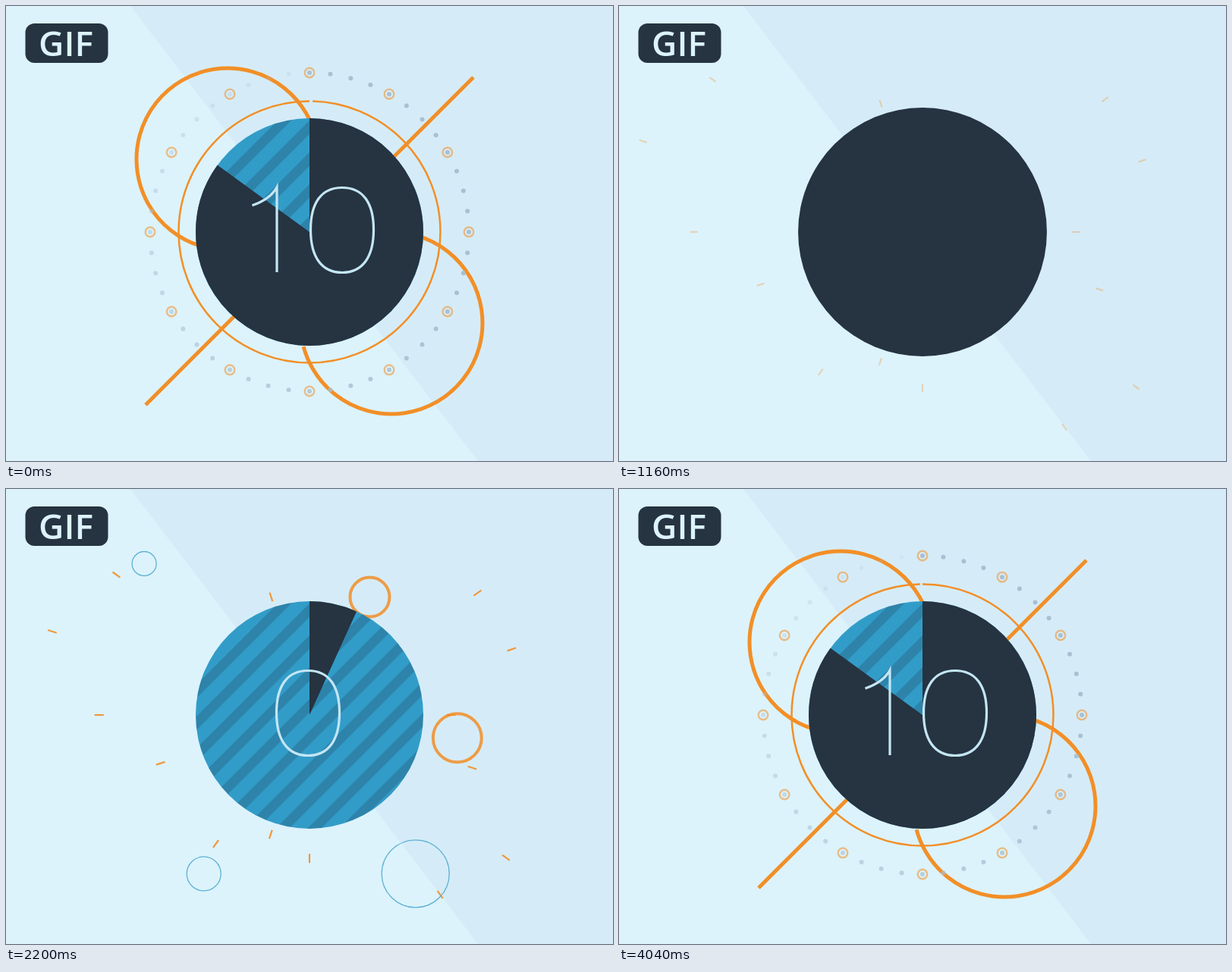
Animation of 800 by 600 pixels, one loop 4.08 s. Source, as an HTML page:

```html
<!DOCTYPE html>
<html lang="en">
<head>
<meta charset="utf-8">
<title>Countdown dial</title>
<style>
  html, body { margin: 0; width: 100%; height: 100%; overflow: hidden; background: #dcf3fc; }
  svg { display: block; width: 800px; height: 600px; }
  .label { font: 600 46px "Open Sans", "Noto Sans", sans-serif; fill: #dcf3fc; text-anchor: middle; }
</style>
</head>
<body>
<svg id="stage" viewBox="0 0 800 600" fill="none">
  <defs>
    <pattern id="stripes" width="29.7" height="30" patternUnits="userSpaceOnUse" patternTransform="rotate(45) translate(-14.85 0)">
      <rect width="29.7" height="30" fill="#329cc8"/>
      <rect width="12.7" height="30" fill="#2d83aa"/>
    </pattern>
    <clipPath id="discClip"><circle id="clipDisc" cx="400" cy="298"/></clipPath>
  </defs>
  <rect width="800" height="600" fill="#dcf3fc"/>
  <path d="M164 0H800V600H622Z" fill="#d5ecf8"/>
  <g id="back"></g>
  <g id="icon">
    <circle id="disc" cx="400" cy="298" fill="#263341"/>
    <g id="cigarette" clip-path="url(#discClip)" fill="#def3fc">
      <path d="M409 230C385 233 378 246 381 260C384 274 397 290 398 305C399 318 386 328 387 346Q390 350 391 347C393 330 406 322 405 303C404 288 395 277 393 264C391 248 397 238 409 230Z"/>
      <path d="M375 305C382 299 392 304 389 313C386 321 380 325 383 334C385 340 389 343 392 350C383 345 374 336 375 327C376 318 385 316 384 309C383 305 379 304 375 305Z"/>
      <path d="M394 342L405 332V351L395 346ZM407 332L486 328L484 332L411 336V345.500L480 343L476 348L407 351.500Z"/>
    </g>
    <circle id="glow" cx="400" cy="298" fill="#f7931e"/>
  </g>
  <circle id="wave" cx="400" cy="298" stroke="#086cb1" opacity=".72"/>
  <g id="dial">
    <circle r="150" fill="url(#stripes)"/>
    <circle id="pie" r="75" stroke="#263341" stroke-width="150" pathLength="1" transform="rotate(-90)"/>
  </g>
  <g id="number" stroke="#c4e6f4" stroke-width="3.200"></g>
  <rect x="25.500" y="23" width="109" height="52" rx="12" fill="#263341"/>
  <text class="label" x="79" y="66">GIF</text>
</svg>
<script>
const LOOP = 4080, CUT = 1150, CX = 400, CY = 298, ORANGE = '#f28f27';
const $ = id => document.getElementById(id);

function add(parent, tag, attrs) {
  const el = document.createElementNS('http://www.w3.org/2000/svg', tag);
  set(el, attrs);
  return parent.appendChild(el);
}
function set(el, attrs) {
  for (const name in attrs) el.setAttribute(name, attrs[name]);
}
const show = (el, on) => set(el, { visibility: on ? 'visible' : 'hidden' });

const clamp = x => Math.min(1, Math.max(0, x));
const span = (t, start, length) => clamp((t - start) / length);
const sine = p => (1 - Math.cos(Math.PI * p)) / 2;
const inQuad = p => p * p;
const inCubic = p => p ** 3;
const outQuad = p => 1 - (1 - p) ** 2;
const outCubic = p => 1 - (1 - p) ** 3;
const outQuart = p => 1 - (1 - p) ** 4;
const inOutCubic = p => p < .5 ? 4 * p ** 3 : 1 - 4 * (1 - p) ** 3;
const backIn = p => 2.7 * p ** 3 - 1.7 * p * p;
const polar = (r, degrees) => {
  const a = degrees * Math.PI / 180;
  return [CX + r * Math.cos(a), CY + r * Math.sin(a)];
};

// Hairline numerals, centred on x = 0 in a 90 px cell
const six = 'M29 241C-10 233-36 258-36 313A36 37 0 1 0-35 309';
const digits = [
  'M-41.5 295C-41.5 259-27 239.5 0 239.5S41.5 259 41.5 295 27 351.5 0 351.5-41.5 331-41.5 295Z',
  'M-28.5 263C-11 257-1 248 4 239V351',
  'M-34 264C-30 247-17 239.5-1 239.5C20 239.5 32 252 32 270C32 292 10 312-36 350H37',
  'M-30 246C-20 241-10 239.5 0 239.5C20 239.5 31 250 31 266S17 293-8 293C20 293 35 304 35 321S20 351.5-4 351.5Q-22 351.5-35 344',
  'M17 351V240L-43 320H41',
  'M30 241H-24L-28 290Q-16 284-2 284C20 284 34 297 34 316C34 338 19 351.5-5 351.5Q-22 351.5-32 345',
  six,
  'M-29.5 241H41C14 268-9 300-10.5 351',
  'M0 292A31 26.2 0 1 1 .1 292A37 29.7 0 1 1 0 292Z',
  six
];

const back = $('back');
const arcs = [[292, 202, 60], [508, 418, 240]].map(([x, y, turn]) => add(back, 'circle', {
  r: 120, stroke: ORANGE, 'stroke-width': 5, pathLength: 360, transform: `translate(${x} ${y}) rotate(${turn})`
}));
const line = add(back, 'path', { stroke: ORANGE, 'stroke-width': 5 });
const ring = add(back, 'circle', {
  r: 172.5, stroke: ORANGE, 'stroke-width': 2.5, pathLength: 1, transform: `translate(${CX} ${CY}) rotate(-90)`
});
const dots = Array.from({ length: 48 }, () => add(back, 'circle', { r: 3, fill: '#a8c0d1' }));
const markers = Array.from({ length: 12 }, () => add(back, 'circle', {
  stroke: ORANGE, 'stroke-width': 2.4, opacity: .55
}));

// Ray angle in steps of 18 degrees, and its reach
const rays = [
  [0, 205], [1, 248], [2, 352], [3, 322], [5, 208], [6, 182], [7, 231],
  [9, 227], [10, 305], [11, 392], [12, 346], [14, 180], [18, 301], [19, 308]
].map(([step, reach]) => ({
  reach, angle: step * 18, el: add(back, 'path', { stroke: ORANGE, 'stroke-width': 2.2 })
}));

const bubbles = [
  [-255, -233.5, 16, 0], [-163, 245, 22.5, 0], [163.5, 245, 44.5, 0], [93, -182, 26, 1], [228, 35.5, 32, 1]
].map(([dx, dy, r, warm]) => ({
  dx, dy, width: warm ? 4 : 1.3,
  el: add(back, 'circle', { r, stroke: warm ? ORANGE : '#5fb0d2', opacity: warm ? .85 : 1 })
}));

const glyphs = [0, 1].map(() => add($('number'), 'path', {}));

function drawNumber(value) {
  const text = String(value);
  glyphs.forEach((el, i) => {
    show(el, i < text.length);
    if (i >= text.length) return;
    const x = 398 + 90 * (i - (text.length - 1) / 2);
    const flip = text[i] === '9' ? ' rotate(180 0 295.5)' : '';
    set(el, { d: digits[text[i]], transform: `translate(${x} 0)${flip}` });
  });
}

function drawLines(t) {
  const sweep = sine(span(t, 2150, 790)) - sine(span(t, LOOP + 560, 485));
  arcs.forEach(el => {
    show(el, sweep > .001);
    set(el, { 'stroke-dasharray': `${40 + 245 * sweep} 400` });
  });

  const reach = 216 * (outCubic(span(t, 2700, 820)) - inCubic(span(t, LOOP + 500, 580)));
  show(line, reach > .1);
  set(line, { d: `M${CX - reach} ${310 + reach}L${CX + reach} ${310 - reach}` });

  const end = sine(span(t, 3240, 830)), start = sine(span(t, 4055, 660));
  show(ring, end - start > .001);
  set(ring, { 'stroke-dasharray': `${end - start} 2`, 'stroke-dashoffset': -start });
}

function drawOrbit(t) {
  const dotRadius = 210 - 80 * inQuad(span(t, LOOP + 560, 440));
  dots.forEach((el, i) => {
    const [cx, cy] = polar(dotRadius, i * 7.5 - 90);
    set(el, { cx, cy, opacity: span(t, 3255 + 15 * i, 600) });
  });
  markers.forEach((el, i) => {
    const k = sine(span(t, 2752 + 17 * i, 600)) - sine(span(t, LOOP + 80 + 17 * i, 500));
    const [cx, cy] = polar(150 + 60 * k, i * 30 - 90);
    show(el, k > .01);
    set(el, { cx, cy, r: 4.5 + 1.8 * k });
  });
}

function drawBurst(t) {
  const gathering = t < 1520;
  const p = gathering ? span(t, 1120, 380) : span(t, 1840, 800);
  const k = gathering ? 1 - p * p : outQuart(p);
  const opacity = gathering ? Math.min(.8, .1 + 2 * p) : Math.min(.9, span(t, 1840, 1) * clamp((2620 - t) / 400));
  rays.forEach(({ el, reach, angle }) => {
    const half = 5 + 12 * (1 - k);
    const [x1, y1] = polar(Math.max(0, reach * k - half), angle);
    const [x2, y2] = polar(reach * k + half, angle);
    show(el, p > 0 && p < 1);
    set(el, { d: `M${x1} ${y1}L${x2} ${y2}`, opacity });
  });

  const b = span(t, 1840, 960);
  bubbles.forEach(({ el, dx, dy, width }) => {
    const far = outQuart(b) / .993;
    show(el, b > 0 && b < 1);
    set(el, { cx: CX + dx * far, cy: CY + dy * far, 'stroke-width': width * clamp((2800 - t) / 280) });
  });
}

function drawDial(t) {
  const shrink = time => 1 - backIn(span(time, 628, 1109));
  const discRadius = 150 * Math.max(0, shrink(t));
  show($('icon'), t < 1792);
  set($('disc'), { r: discRadius });
  set($('clipDisc'), { r: discRadius });
  set($('cigarette'), { opacity: span(t, 1170, 130) });

  const g = span(t, 1520, 272);
  set($('glow'), { r: 110 * outQuad(g), opacity: .62 * (1 - g) });

  const mid = 182 * outCubic(span(t, 1469, 627));
  const width = Math.max(0, Math.min(2 * mid, 30 - (t - 1560) * .0719));
  show($('wave'), mid > 0 && width > 0);
  set($('wave'), { r: mid, 'stroke-width': width });

  const scale = t > LOOP ? shrink(t - LOOP) : outCubic(span(t, 1620, 523));
  const count = inOutCubic(span(t, 1960, 888));
  const filled = .85 * count + .15 * sine(span(t, 5000, 200));
  show($('dial'), t >= 1620);
  set($('dial'), { transform: `translate(${CX} ${CY}) scale(${scale})` });
  show($('pie'), t >= 1620 && filled > 0);
  set($('pie'), { 'stroke-dasharray': filled < 1 ? `${filled} 2` : 'none' });

  drawNumber(Math.floor(10 * count));
  set($('number'), { opacity: span(t, 1660, 120) * (1 - span(t, 5080, 140)) });
}

// The cycle is cut where the scene is emptiest, so every motion runs unbroken
function render(ms) {
  const t = CUT + ((ms - CUT) % LOOP + LOOP) % LOOP;
  drawLines(t);
  drawOrbit(t);
  drawBurst(t);
  drawDial(t);
}

const began = performance.now();
function tick() {
  render((performance.now() - began) % LOOP);
  requestAnimationFrame(tick);
}
render(0);
requestAnimationFrame(tick);
</script>
</body>
</html>
```
